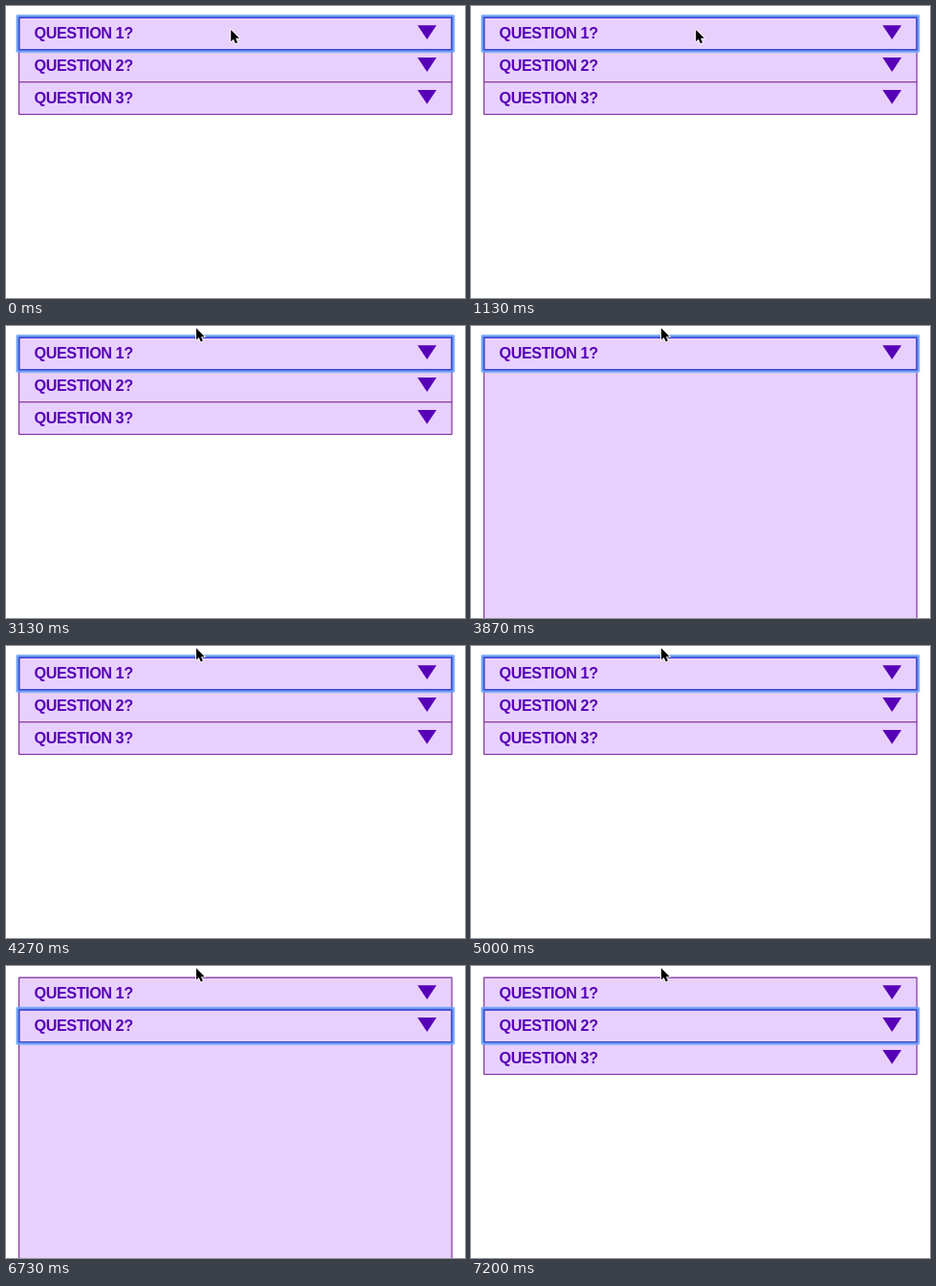
Write an HTML page with a canvas that moves like this. It is 480 px wide and 306 px high and loops after 7.87 s.

```html
<!DOCTYPE html>
<html lang="en">
<head>
<meta charset="utf-8">
<title>Accordion</title>
<style>
  html, body { margin: 0; width: 100%; height: 100%; overflow: hidden; background: #fff; }
  canvas { display: block; width: 480px; height: 306px; }
</style>
</head>
<body>
<canvas id="stage"></canvas>
<script>
const W = 480, H = 306, LOOP = 7870, TICK = 1000 / 15;
const LEFT = 13.6, RIGHT = 466.2, TOP = 12.1, ROW = 33.8;
const FILL = '#e8d0fd', INK = '#5600b8', BORDER = '#7a2a9c';
const PANEL = H;

// [start, end, row]
const OPEN = [[70, 1130, 0], [3800, 4270, 0], [4670, 5000, 0], [5600, 5930, 0], [6730, 7130, 1]];
const FOCUS = [[0, 2130, 0], [3130, 6470, 0], [6470, LOOP, 1]];

const canvas = document.getElementById('stage');
const ctx = canvas.getContext('2d');
const dpr = window.devicePixelRatio || 1;
canvas.width = W * dpr;
canvas.height = H * dpr;

function activeRow(spans, t) {
  const span = spans.find(([start, end]) => t >= start && t < end);
  return span ? span[2] : -1;
}

function polygon(points) {
  ctx.beginPath();
  points.forEach(([x, y]) => ctx.lineTo(x, y));
  ctx.closePath();
}

function drawBox(y, height) {
  ctx.fillStyle = FILL;
  ctx.fillRect(LEFT, y, RIGHT - LEFT, height);
  ctx.strokeStyle = BORDER;
  ctx.lineWidth = 1.1;
  ctx.strokeRect(LEFT, y, RIGHT - LEFT, height);
}

function drawHeader(index, y) {
  drawBox(y, ROW);
  ctx.fillStyle = INK;
  ctx.font = 'bold 16.2px "Liberation Sans", Arial, sans-serif';
  ctx.letterSpacing = '-0.45px';
  ctx.fillText(`QUESTION ${index + 1}?`, 29.6, y + 22);
  polygon([[430.4, y + 8.2], [450.2, y + 8.2], [440.3, y + 23]]);
  ctx.fill();
}

// The panel shares the header's fill, so no line divides them.
function drawPanel(y) {
  drawBox(y, PANEL);
  ctx.fillStyle = FILL;
  ctx.fillRect(LEFT + 0.6, y - 1, RIGHT - LEFT - 1.2, 2);
}

// The glow lies outside the header's edge, the dark line on it.
function drawRing(y) {
  const layers = [
    { width: 4.6, outset: 1.3, color: 'rgba(120,170,255,.4)' },
    { width: 2.6, outset: 1.3, color: '#6a9ff5' },
    { width: 1.4, outset: -0.1, color: '#3d43d0' },
  ];
  ctx.lineJoin = 'round';
  for (const { width, outset, color } of layers) {
    ctx.lineWidth = width;
    ctx.strokeStyle = color;
    ctx.strokeRect(LEFT - outset, y - outset, RIGHT - LEFT + 2 * outset, ROW + 2 * outset);
  }
}

function drawCursor(t) {
  const step = Math.floor((t - 1600) / TICK + 0.05) + 1;
  const k = Math.min(1, Math.max(0, step / 7));
  const ease = k * k * (3 - 2 * k);
  ctx.save();
  ctx.translate(235.2 - 36.2 * ease, 25 - 22.7 * ease);
  ctx.scale(0.86, 0.86);
  polygon([[0, 0], [0, 14.2], [3.2, 11.2], [5.5, 16.5], [8, 15.4], [5.8, 10.3], [10.2, 10.3]]);
  ctx.lineJoin = 'round';
  ctx.lineWidth = 2;
  ctx.strokeStyle = '#fff';
  ctx.stroke();
  ctx.fillStyle = '#000';
  ctx.fill();
  ctx.restore();
}

function draw(t) {
  ctx.setTransform(dpr, 0, 0, dpr, 0, 0);
  ctx.fillStyle = '#fff';
  ctx.fillRect(0, 0, W, H);
  const open = activeRow(OPEN, t);
  const focus = activeRow(FOCUS, t);
  let y = TOP, ringY = null;
  for (let i = 0; i < 3; i++) {
    drawHeader(i, y);
    if (i === focus) ringY = y;
    y += ROW;
    if (i === open) {
      drawPanel(y);
      y += PANEL;
    }
  }
  if (ringY !== null) drawRing(ringY);
  drawCursor(t);
}

const start = performance.now();
function frame() {
  draw((performance.now() - start) % LOOP);
  requestAnimationFrame(frame);
}
frame();
</script>
</body>
</html>
```
